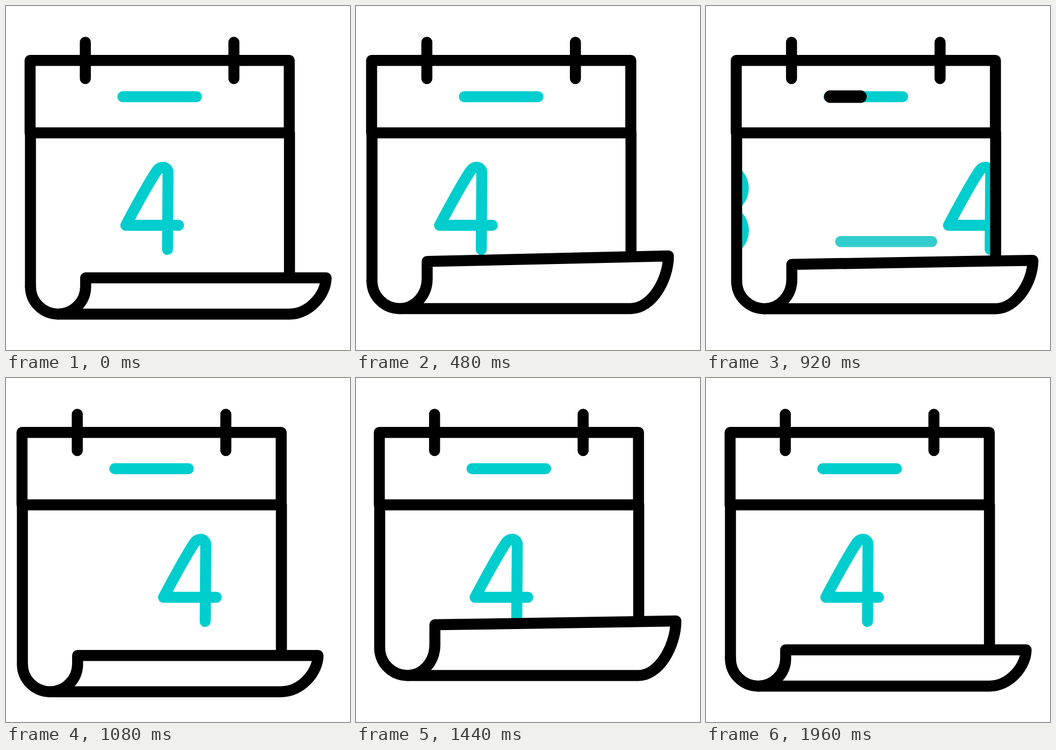
An HTML page that plays this animation: 640 px wide and 640 px high, repeating every 2880 ms.

```html
<!DOCTYPE html>
<html lang="en">
<head>
<meta charset="utf-8">
<title>Calendar</title>
<style>
  html, body { margin: 0; width: 100%; height: 100%; overflow: hidden; background: #fff; }
  svg { display: block; width: 100vw; height: 100vh; }
  .line { fill: none; stroke: #000; stroke-width: 20.5; stroke-linecap: round; stroke-linejoin: round; }
  .accent { stroke: #00cdcd; }
  .pale { stroke: #33cccc; }
</style>
</head>
<body>
<svg viewBox="0 0 640 640">
  <defs>
    <clipPath id="page"><rect x="46" y="240" width="481" height="330"/></clipPath>
    <path id="four" d="M300.5 453L301.5 310C301.5 300 288 294 279 309C263 333 240 376 223 408H321"/>
    <path id="three" d="M586.5 331A39.5 39.5 0 1 1 625.5 378.5A39.5 39.5 0 1 1 586.5 425"/>
  </defs>
  <g id="calendar">
    <g clip-path="url(#page)">
      <g id="strip" class="line accent">
        <use href="#four"/>
        <use href="#three"/>
        <use href="#four" x="823.5"/>
      </g>
    </g>
    <path id="rule" class="line pale"/>
    <path id="sides" class="line"/>
    <path id="curl" class="line" style="fill:#fff"/>
    <path id="roll" class="line"/>
    <path class="line" d="M44.8 236V101.3H527V236Z M147.6 67.5V135M424 67.5V135"/>
    <path class="line accent" d="M217.4 168.7H354.3"/>
    <path id="sweep" class="line" style="stroke-width:23.2"/>
  </g>
</svg>
<script>
const LOOP = 2880, STEP = 40;
const el = id => document.getElementById(id);
const [calendar, strip, rule, sides, curl, roll, sweep] =
  ["calendar", "strip", "rule", "sides", "curl", "roll", "sweep"].map(el);

// Cubic ease with flat ends; a and b are the x positions of its handles.
function ease(x, a = 1 / 3, b = 2 / 3) {
  if (x <= 0) return 0;
  if (x >= 1) return 1;
  let lo = 0, hi = 1;
  for (let i = 0; i < 24; i++) {
    const p = (lo + hi) / 2, q = 1 - p;
    if (3 * a * p * q * q + 3 * b * p * p * q + p * p * p < x) lo = p; else hi = p;
  }
  return lo * lo * (3 - 2 * lo);
}

// Each key is [time, value, handle a, handle b]; handles shape the move into it.
function track(keys, t) {
  for (let i = 1; i < keys.length; i++) {
    const [t0, v0] = keys[i - 1], [t1, v1, a, b] = keys[i];
    if (t < t1) return v0 + (v1 - v0) * ease((t - t0) / (t1 - t0), a, b);
  }
  return keys[keys.length - 1][1];
}

const sway = [[0, 0], [281, 32], [557, -27], [845, 20.3], [1075, -15], [1526, 0]];
const scroll = [[0, 0], [275, 44], [1375, -823.5, 0.333, 0.47]];
// Vertical moves of the sheet: bottom shift, lift of the flap, extra lift at its right end.
const flapKeys = (down, up1, rest, up2) =>
  [[0, 0], [320, down], [640, up1], [1085, rest, 0.333, 0.765], [1520, up2], [1960, 0]];
const drop = flapKeys(24.4, -45, 10.5, -22.7);
const lift = flapKeys(0, -40.5, 0, -29.6);
const tilt = flapKeys(0, -20.5, 0, -7.7);

function draw(t) {
  const dx = track(sway, t);
  const b = track(drop, t), l = track(lift, t), k = track(tilt, t);
  const bottom = 573.2 + b, left = 505.8 + b + l, right = left + k;
  const arc = 521.7 + b, bend = arc + 0.2 * l;
  const tip = 595.5 - 0.15 * k;
  const h = bottom - right;

  calendar.setAttribute("transform", `translate(${dx} 0)`);
  strip.setAttribute("transform", `translate(${track(scroll, t)} 0)`);

  const join = left + k * (527.4 - 148.2) / (tip - 148.2);
  sides.setAttribute("d", `M45.5 236V${arc}M527.4 236V${join}`);
  const turn = `C148.2 ${bend + (bottom - bend) * 0.55} 125.4 ${bottom} 97 ${bottom}`;
  curl.setAttribute("d", `M97 ${bottom}H527.4C${527.4 + (tip - 527.4) * 0.55} ${bottom} ${tip} ` +
    `${right + h * 0.45} ${tip} ${right}L148.2 ${left}V${bend}${turn}`);
  roll.setAttribute("d", `M45.5 ${arc}A51.5 51.5 0 0 0 97 ${bottom}`);

  // The pale rule follows the flap but ignores the sideways sway.
  const y = (left + right) / 2 - 38.7;
  rule.setAttribute("d", t >= 520 && t < 1040 ? `M${250.5 - dx} ${y}H${420 - dx}` : "");

  const head = 354.5 - 134.8 * ease((t - 560) / 280);
  const tail = 354.5 - 134.8 * ease((t - 720) / 360);
  sweep.setAttribute("d", tail - head > 0.1 ? `M${tail} 168.7H${head}` : "");
}

let start;
function frame(now) {
  start ??= now;
  draw(Math.floor(((now - start) % LOOP) / STEP) * STEP);
  requestAnimationFrame(frame);
}
draw(0);
requestAnimationFrame(frame);
</script>
</body>
</html>
```
